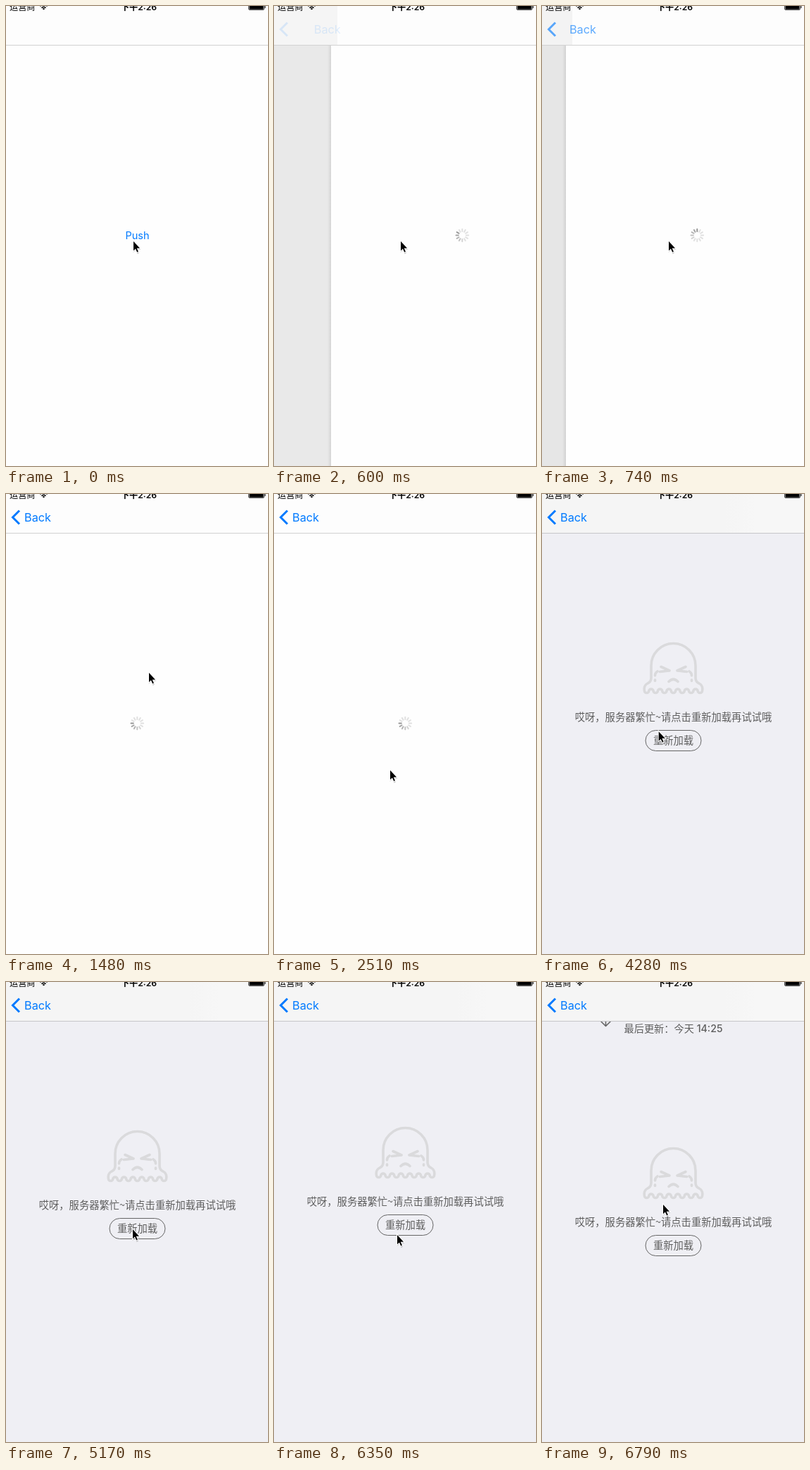
Recreate the animation shown at these times as an HTML page. Size 372 by 651 pixels, loop 8000 ms.

```html
<!DOCTYPE html>
<html lang="zh-CN">
<head>
<meta charset="utf-8">
<style>
  html, body { margin: 0; width: 100%; height: 100%; overflow: hidden; background: #fefefe; }
  svg { display: block; width: 372px; height: 651px; }
  text { font-family: Inter, "Noto Sans CJK SC", "Noto Sans CJK", sans-serif; }
  .note { fill: #5e5e5e; font-size: 14.2px; text-anchor: middle; }
  .cjk { font-family: "Noto Sans CJK SC", "Noto Sans CJK", sans-serif; font-size: 14.3px; }
  .line { fill: none; stroke-linecap: round; stroke-linejoin: round; }
</style>
</head>
<body>
<svg viewBox="0 0 372 651">
  <defs>
    <linearGradient id="edge">
      <stop offset="0" stop-color="#000" stop-opacity="0"/>
      <stop offset="1" stop-color="#000" stop-opacity=".09"/>
    </linearGradient>
    <linearGradient id="bar">
      <stop offset=".7" stop-color="#f5f5f5"/>
      <stop offset=".82" stop-color="#f7f7f7"/>
    </linearGradient>
  </defs>

  <rect width="372" height="651" fill="#fefefe"/>
  <text id="push" y="330" font-size="14.5" fill="#007aff" text-anchor="middle">Push</text>
  <rect id="dim" width="372" height="651"/>

  <g id="page">
    <rect x="-5" width="5" height="651" fill="url(#edge)"/>
    <rect id="paper" width="372" height="651"/>
    <g id="spinner" transform="translate(186.3 324.5)" stroke-width="2" stroke-linecap="round"></g>
  </g>

  <g id="error">
    <text class="note" x="186.5" y="-163.300" font-weight="500">最后更新：今天 14:25</text>
    <path class="line" d="M90.5-199V-171.500M83.500-178.500L90.500-171.500L97.500-178.500" stroke="#666" stroke-width="1.6"/>
    <g class="line" stroke="#dadadc" stroke-width="3.6">
      <path id="ghost"/>
      <path d="M169 34.500L181 40L167.500 41.500M204 34.500L192 40L205.500 41.500M180 55.500Q186.500 49 193 55.500"/>
      <path d="M164 41Q160.500 43 160.500 47M160.500 53V54.500M209 41Q212.500 43 212.500 47M212.500 53V54.500"/>
    </g>
    <text class="note cjk" x="186.5" y="111">哎呀，服务器繁忙~请点击重新加载再试试哦</text>
    <rect x="147" y="124.500" width="79" height="29" rx="14.5" fill="none" stroke="#666"/>
    <text class="note cjk" x="186.5" y="144.200">重新加载</text>
  </g>

  <rect id="nav" width="372" height="55"/>
  <rect id="tint" height="55"/>
  <rect id="rule" y="55" width="372" height="1"/>
  <g id="back">
    <path d="M19 23.500L9.500 33L19 42.500" fill="none" stroke="#007aff" stroke-width="3"/>
    <text id="label" y="39" font-size="16.3" fill="#007aff">Back</text>
  </g>

  <text x="5" y="5.500" font-size="12.2">运营商</text>
  <g class="line" stroke="#000" stroke-width="1.6">
    <path d="M49 0Q53.500-4 58 0M51 2.300Q53.500 .3 56 2.300"/>
    <circle cx="53.500" cy="4" r=".5"/>
  </g>
  <text x="188.5" y="5.500" font-size="12.2" font-weight="600" text-anchor="middle">下午2:26</text>
  <rect x="344.500" y="-4" width="22" height="9.500" rx="1.500" fill="none" stroke="#000" stroke-width=".7"/>
  <path d="M345.500-3H365.500V4.700H345.500ZM367.500-1H368.500V3H367.500Z"/>

  <g id="cursor">
    <path d="M0 0V15.500L3.500 12.300L6 17.500L8.500 16.300L6.200 11.200H11Z" fill="#0003" transform="translate(.5 1.500)"/>
    <path d="M1 1V14.300L3.900 11.500L6.200 16.400L7.900 15.600L5.700 10.700H10Z" stroke="#fff" stroke-width="2" paint-order="stroke"/>
  </g>
</svg>

<script>
const LOOP = 8000, STEP = 147.6, LAST = 46;
const $ = id => document.getElementById(id);
const set = (id, attrs) => {
  for (const name in attrs) $(id).setAttribute(name, attrs[name]);
};
const clamp = v => Math.max(0, Math.min(1, v));

// Keys are [step, value, ...]; values are interpolated linearly.
const slide = [[1, 372], [2, 270], [3, 163], [4, 81], [5, 34], [6, 11], [7, 2], [8, 0]];
const scroll = [[35, 210], [37, 205], [43, 205], [46, 234]];
const pointer = [
  [0, 180, 332], [4, 179, 332], [8, 179, 332], [9, 198, 268], [10, 202, 252],
  [16, 162, 388], [17, 164, 390], [20, 190, 330], [22, 152, 290], [24, 155, 257],
  [25, 155, 262], [32, 172, 390], [33, 176, 398], [35, 179, 349], [39, 174, 358],
  [43, 174, 357], [46, 171, 314]
];

function at(keys, k) {
  const i = keys.findIndex(key => key[0] > k);
  if (i < 0) return keys[keys.length - 1].slice(1);
  if (i === 0) return keys[0].slice(1);
  const a = keys[i - 1], b = keys[i], p = (k - a[0]) / (b[0] - a[0]);
  return a.slice(1).map((v, j) => v + (b[j + 1] - v) * p);
}

// Body outline with a scalloped hem.
let hem = "";
for (let i = 0; i < 13; i++) hem += `a3.150 2.700 0 0 ${i % 2 ? 0 : 1} -6.310 0`;
$("ghost").setAttribute("d",
  `M155 33A31.500 31.500 0 0 1 218 33V50Q218 56 223 58Q229 61 227.500 68.800${hem}Q144 61 150 58Q155 56 155 50Z`);

for (let i = 0; i < 12; i++) {
  $("spinner").innerHTML += `<path d="M0-5.500V-8.800" transform="rotate(${i * 30})"/>`;
}
const spokes = [...$("spinner").children];

function draw(t) {
  const k = Math.min(LAST, Math.floor((t + 4) / STEP));
  const [off] = at(slide, k), [top] = at(scroll, k), [x, y] = at(pointer, k);
  const done = 1 - off / 372, gray = k >= 25;

  set("push", { x: 186.5 - 0.3 * (372 - off) });
  set("dim", { opacity: 0.105 * done });
  set("page", { transform: `translate(${off})`, visibility: off < 372 ? "visible" : "hidden" });
  set("paper", { fill: gray ? "#efeff4" : "#fefefe" });
  set("spinner", { visibility: gray ? "hidden" : "inherit" });
  set("error", { transform: `translate(0 ${top})`, visibility: k >= 26 ? "visible" : "hidden" });
  set("nav", { fill: gray ? "url(#bar)" : "#fdfdfd" });
  set("tint", { width: off ? off + 9 : 0, opacity: 0.042 * done });
  set("rule", { fill: gray ? "#c6c6c9" : "#d2d2d2" });
  set("back", { opacity: clamp(1 - off / 92) });
  set("label", { x: 26 + 0.38 * off });
  set("cursor", { transform: `translate(${x} ${y})` });

  const head = Math.floor(9.3 + 12 * (k * STEP - 1476) / 1000);
  spokes.forEach((spoke, i) => {
    const age = ((head - i) % 12 + 12) % 12;
    const shade = Math.min(224, 150 + age * 15);
    spoke.setAttribute("stroke", `rgb(${shade},${shade},${shade})`);
  });
}

const start = performance.now();
function tick() {
  draw((performance.now() - start) % LOOP);
  requestAnimationFrame(tick);
}
tick();
</script>
</body>
</html>
```
